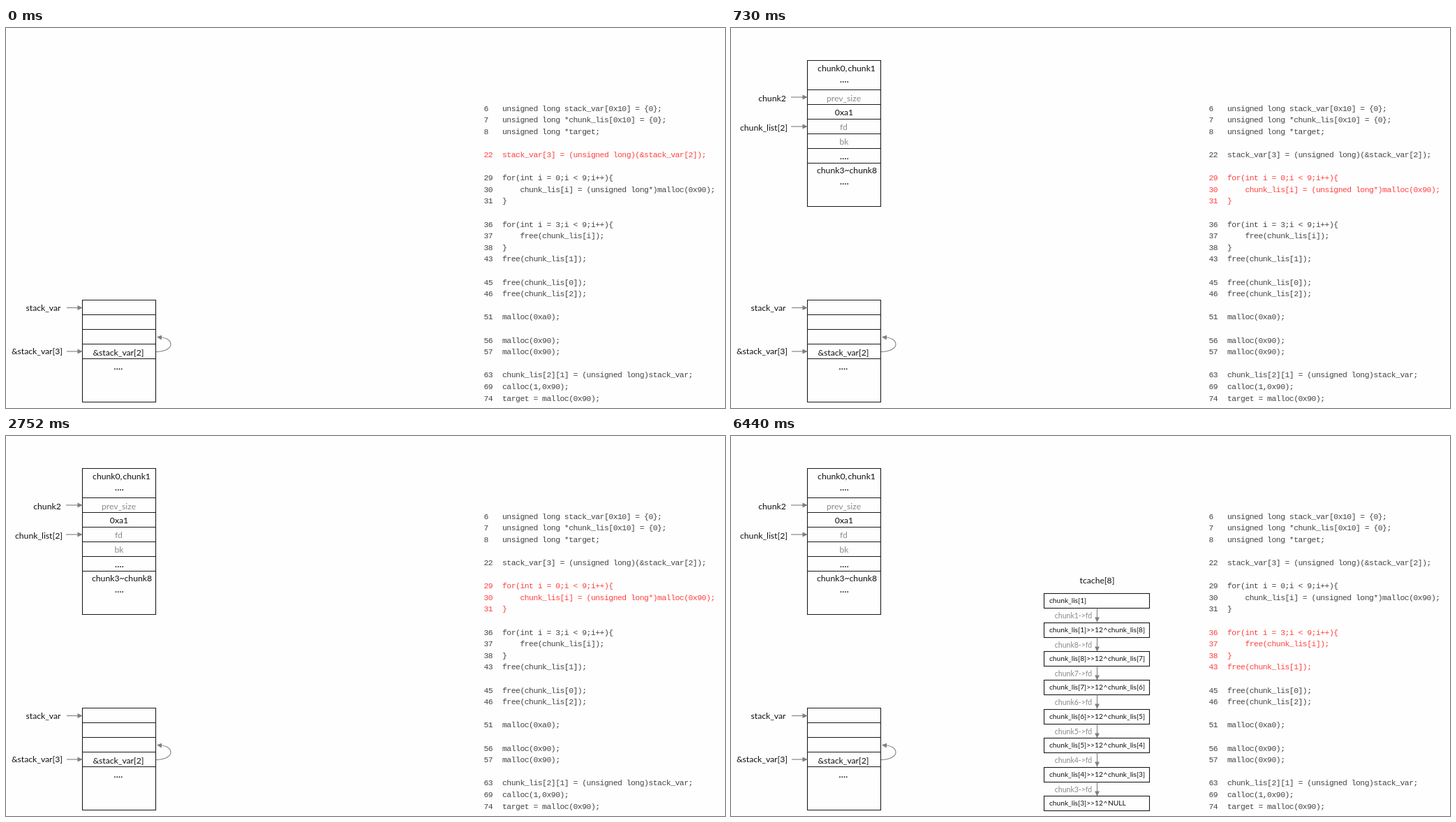
These frames come from a looping animation (1030 by 544 pixels, 8 s). An HTML page:

```html
<!DOCTYPE html>
<html lang="en">
<head>
<meta charset="utf-8">
<title>Heap walkthrough</title>
<style>
html, body { margin: 0; width: 100%; height: 100%; overflow: hidden; background: #fefefe; }
svg { display: block; }
text { font-family: Lato, sans-serif; font-size: 12.2px; word-spacing: -2px; white-space: pre; fill: #111; }
.mid { text-anchor: middle; }
.dim { fill: #8a8a8a; }
.dots { font-weight: bold; letter-spacing: 0.4px; }
.small { font-size: 10.2px; }
.edge { font-size: 10.5px; fill: #8a8a8a; }
.code text { font-family: "Liberation Mono", monospace; font-size: 11.4px; letter-spacing: -0.49px; word-spacing: 0; fill: #444; }
.code .hot text { fill: #ff4040; }
.box { fill: none; stroke: #1a1a1a; stroke-width: 1.1; }
.wire { fill: none; stroke: #7f7f7f; stroke-width: 1.1; }
.head { fill: #7f7f7f; }
</style>
</head>
<body>
<svg id="stage" width="1030" height="544" viewBox="0 0 1030 544">
  <g id="stack"></g>
  <g id="heap"></g>
  <g id="tcache"></g>
  <g id="code" class="code"></g>
</svg>
<script>
const LOOP = 8000, HEAP_AT = 730, TCACHE_AT = 4100;
const $ = id => document.getElementById(id);

function add(parent, tag, attrs, content = '') {
  const el = document.createElementNS('http://www.w3.org/2000/svg', tag);
  for (const k in attrs) el.setAttribute(k, attrs[k]);
  el.textContent = content;
  return parent.appendChild(el);
}
const label = (g, s, x, y, cls = 'mid') => add(g, 'text', { x, y, class: cls }, s);
const dots = (g, x, y) => label(g, '....', x, y, 'mid dots');

function arrow(g, x1, y1, x2, y2) {
  const angle = Math.atan2(y2 - y1, x2 - x1) * 180 / Math.PI;
  add(g, 'path', { d: `M${x1} ${y1}L${x2} ${y2}`, class: 'wire' });
  head(g, x2, y2, angle);
}
const head = (g, x, y, angle) => add(g, 'path', {
  d: 'M0 0L-7 -3.4V3.4Z', class: 'head', transform: `translate(${x} ${y}) rotate(${angle})`
});

function memory(g, top, bottom, rules) {
  const lines = rules.map(y => `M109.5 ${y}H214.5`).join('');
  add(g, 'path', { d: `M109.5 ${top}H214.5V${bottom}H109.5Z${lines}`, class: 'box' });
}

// Stack
const stack = $('stack');
memory(stack, 389.5, 535.5, [410.5, 431.5, 452.5, 473.5]);
label(stack, 'stack_var', 53.5, 405);
label(stack, '&stack_var[3]', 44.5, 467);
label(stack, '&stack_var[2]', 161, 469);
dots(stack, 161, 489);
arrow(stack, 87, 400.5, 109.5, 400.5);
arrow(stack, 87, 463, 109.5, 463);
add(stack, 'path', { d: 'M215 463.5C229 463 236 458 236 453C236 447 230 444 222 442.8', class: 'wire' });
head(stack, 216, 442.3, 186);

// Heap
const heap = $('heap');
memory(heap, 46.5, 255.5, [88.5, 109.5, 130.5, 151.5, 172.5, 193.5]);
label(heap, 'chunk0, chunk1', 165.5, 62);
label(heap, 'prev_size', 161.5, 105, 'mid dim');
label(heap, '0xa1', 162, 125);
label(heap, 'fd', 161.5, 146, 'mid dim');
label(heap, 'bk', 162, 167, 'mid dim');
label(heap, 'chunk3~chunk8', 166, 208);
for (const y of [78, 188, 224]) dots(heap, 162.5, y);
label(heap, 'chunk2', 59, 105);
label(heap, 'chunk_list[2]', 47, 146.5);
arrow(heap, 86, 99, 109.5, 99);
arrow(heap, 86, 141, 109.5, 141);

// Free list
const tcache = $('tcache');
label(tcache, 'tcache[8]', 524.5, 211);
const order = [1, 8, 7, 6, 5, 4, 3];
for (let i = 0; i < 8; i++) {
  const y = Math.round(225.2 + i * 41.4) + 0.5, prev = order[i - 1];
  const next = i < 7 ? `chunk_lis[${order[i]}]` : 'NULL';
  add(tcache, 'rect', { x: 448.5, y, width: 151, height: 21, class: 'box' });
  label(tcache, i ? `chunk_lis[${prev}]>>12 ^ ${next}` : next, 456, y + 13.5, 'small');
  if (i < 7) {
    arrow(tcache, 524.5, y + 21, 524.5, y + 41);
    label(tcache, `chunk${order[i]}->fd`, 490.5, y + 35, 'mid edge');
  }
}

// Listing: one entry per row, blank rows separate the steps
const listing = `6 unsigned long stack_var[0x10] = {0};
7 unsigned long *chunk_lis[0x10] = {0};
8 unsigned long *target;

22 stack_var[3] = (unsigned long)(&stack_var[2]);

29 for(int i = 0;i < 9;i++){
30     chunk_lis[i] = (unsigned long*)malloc(0x90);
31 }

36 for(int i = 3;i < 9;i++){
37     free(chunk_lis[i]);
38 }
43 free(chunk_lis[1]);

45 free(chunk_lis[0]);
46 free(chunk_lis[2]);

51 malloc(0xa0);

56 malloc(0x90);
57 malloc(0x90);

63 chunk_lis[2][1] = (unsigned long)stack_var;
69 calloc(1,0x90);
74 target = malloc(0x90);`;
let row = 0;
const blocks = listing.split('\n\n').map(block => {
  const g = add($('code'), 'g', {});
  for (const line of block.split('\n')) {
    const cut = line.indexOf(' '), y = 118.6 + 16.6 * row++;
    label(g, line.slice(0, cut), 684.5, y, '');
    label(g, line.slice(cut + 1), 711, y, '');
  }
  row++;
  return g;
});

function draw() {
  const t = performance.now() % LOOP;
  const step = t < HEAP_AT ? 1 : t < TCACHE_AT ? 2 : 3;
  heap.style.display = step > 1 ? '' : 'none';
  tcache.style.display = step > 2 ? '' : 'none';
  blocks.forEach((g, i) => g.setAttribute('class', i === step ? 'hot' : ''));
  requestAnimationFrame(draw);
}
draw();
</script>
</body>
</html>
```
